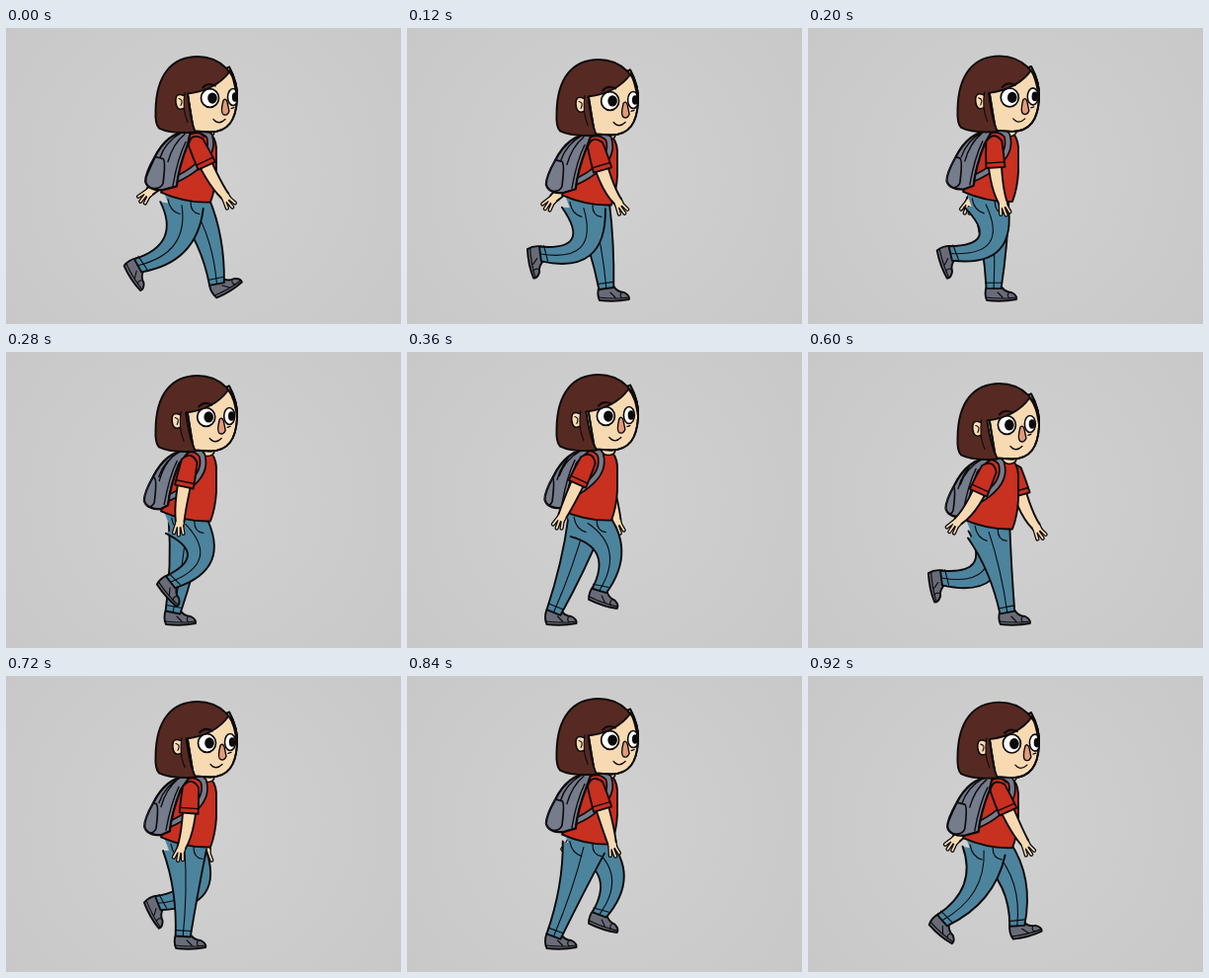
An HTML page with a canvas that plays this animation: 400 px wide and 300 px high, repeating every 0.96 s.

```html
<!DOCTYPE html>
<html lang="en">
<head>
<meta charset="utf-8">
<title>Walk cycle</title>
<style>
html, body { margin: 0; width: 100%; height: 100%; overflow: hidden; background: #cbcbcb; }
canvas { display: block; }
</style>
</head>
<body>
<canvas id="stage" width="400" height="300"></canvas>
<script>
const g = document.getElementById('stage').getContext('2d');
const LOOP = 960, STEP = 40, TAU = Math.PI * 2;
const INK = '#0d0a0b', SKIN = '#f8dab2', HAIR = '#562a22', RED = '#c83020',
      JEANS = '#4c849e', PACK = '#757c8c', SHOE = '#686c78';

const { sin, cos, max, hypot } = Math;
const rad = deg => deg * Math.PI / 180;
const mix = (a, b, u) => [a[0] + (b[0] - a[0]) * u, a[1] + (b[1] - a[1]) * u];

// Point at a distance from p, swung forward from straight down.
const swing = (p, length, deg) => [p[0] + length * sin(rad(deg)), p[1] + length * cos(rad(deg))];

function line(d, width = 1.4, color = INK) {
  g.strokeStyle = color;
  g.lineWidth = width;
  g.stroke(new Path2D(d));
}

function shape(d, fill, width = 1.9) {
  g.fillStyle = fill;
  g.fill(new Path2D(d));
  if (width) line(d, width);
}

function ellipse(x, y, rx, ry, fill, width = 0) {
  g.beginPath();
  g.ellipse(x, y, rx, ry, 0, 0, TAU);
  g.fillStyle = fill;
  g.fill();
  if (width) { g.strokeStyle = INK; g.lineWidth = width; g.stroke(); }
}

function at(x, y, angle, paint) {
  g.save();
  g.translate(x, y);
  g.rotate(angle);
  paint();
  g.restore();
}

// Tapered limb through three points with half widths.
function limb(points, widths, fill, endClosed, roundTop) {
  const [a, b, c] = points;
  const dirs = [[a, b], [a, c], [b, c]].map(([p, q]) => {
    const l = hypot(q[0] - p[0], q[1] - p[1]) || 1;
    return [(q[0] - p[0]) / l, (q[1] - p[1]) / l];
  });
  const side = s => points.map((p, i) =>
    [p[0] - dirs[i][1] * widths[i] * s, p[1] + dirs[i][0] * widths[i] * s]);
  const bend = (p, q, r) => {
    const m = mix(p, r, .5);
    return `Q${[q[0] + .85 * (q[0] - m[0]), q[1] + .85 * (q[1] - m[1])]} ${r}`;
  };
  const L = side(1), R = side(-1);
  const outline = joint => `M${L[0]}${bend(...L)}${joint}${R[2]}${bend(R[2], R[1], R[0])}`;
  const top = [a[0] - dirs[0][0] * widths[0] * 1.4, a[1] - dirs[0][1] * widths[0] * 1.4];
  const cap = roundTop ? `Q${top} ${L[0]}` : '';
  shape(outline('L') + cap, fill, 0);
  line(outline(endClosed ? 'L' : 'M') + cap, 1.9);
  return { mid: `M${a}${bend(a, b, c)}`, band: u => `M${mix(L[2], L[1], u)}L${mix(R[2], R[1], u)}` };
}

function hand(wrist, deg) {
  at(...wrist, rad(90 - deg), () => {
    const fingers = 'M3 -2L12 -4.5M4 1L14 0M3 3L12 5';
    line(fingers, 4.2);
    shape('M-1 -4.5L5 -4Q8 0 5 4L-1 4.5', SKIN, 1.4);
    line(fingers, 1.7, SKIN);
    shape('M-3 -4L5 -3L6 3L-3 4Z', SKIN, 0);
  });
}

// The arm is a pendulum whose forearm trails the upper arm a little.
function arm(phase, shoulder) {
  const upper = -4 + 29 * cos(phase), fore = -5 + 40 * cos(phase - .26);
  const elbow = swing(shoulder, 37, upper), wrist = swing(elbow, 25, fore);
  hand(wrist, fore);
  limb([shoulder, elbow, wrist], [7, 6.2, 4.3], SKIN);
  const sleeve = limb([shoulder, mix(shoulder, elbow, .36), mix(shoulder, elbow, .72)],
    [8, 9, 9.5], RED, true, true);
  line(sleeve.band(.38));
}

// Foot pose: planted and sliding back, then lifted and thrown forward.
function foot(phase) {
  const u = phase / TAU % 1;
  const air = max(0, (u - .39) / .61) ** .85;
  const landing = max(0, 1 - u / .08);
  const x = 170 + 40 * cos(phase) + 10 * sin(phase)
    + 3.5 * cos(2 * phase) - 1.6 * sin(2 * phase) - 2.7 * sin(3 * phase);
  return {
    x,
    lift: 36 * sin(.96 * Math.PI * air) + 4.5 * landing,
    pitch: rad(80 * sin(1.12 * Math.PI * air) - 30 * landing)
  };
}

function leg(phase, hip, hipWidth, near) {
  const { x, lift, pitch } = foot(phase);
  const ankle = [x, 264 - lift];
  const dx = ankle[0] - hip[0], dy = ankle[1] - hip[1], reach = hypot(dx, dy);
  const bend = 2 + .72 * lift;
  const [mx, my] = mix(hip, ankle, .48);
  const knee = [mx + dy / reach * bend, my - dx / reach * bend];

  at(...ankle, pitch, () => {
    shape('M-7 -3L7 -3Q11 4 18 4Q24 7 23 11Q9 14 -7 12Q-10 5 -7 -3Z', SHOE);
    line('M-8 9Q8 11 23 9M4 4L9 9M15 5Q13 7 16 10', 1.1);
  });
  const trouser = limb([hip, knee, ankle], [hipWidth, 12.5, 7.5], JEANS, true);
  line(trouser.band(.13), 1.1);
  line(trouser.mid, 1.1);
  if (near) {
    at(...hip, 0, () => line('M9 -3Q9 8 18 9M-14 -6Q-12 6 -2 9', 1.2));
  }
}

function torso(bob, sx) {
  at(0, bob, 0, () => {
    shape(`M${sx - 9} 108Q${sx} 103 190 103L205 104Q212 108 213 120L213 145Q212 162 207 175Q182 176 157 165Q164 150 165 136Q166 118 ${sx - 9} 108Z`, RED);
    ellipse(204, 104, 7, 5, SKIN, 1.5);
  });
}

function backpack(turn, bob, sx) {
  const r = 6 * turn;
  at(turn, bob, 0, () => {
    const strap = `M178 106Q${sx + 4} 97 ${sx + 13} 108Q${sx + 18} 125 ${sx} 139Q${sx - 8} 146 ${165 + r} 152`;
    line(strap, 7.5);
    line(strap, 4.2, PACK);
    const body = `M184 103Q162 104 149 130Q140 146 140 154Q142 163 157 163L${166 + r} 159Q${168 + r} 140 ${177 + r} 117L186 104Z`;
    shape(body, PACK);
    line(`M177 104Q160 114 155 130M${174 + r} 106Q${162 + r} 116 ${157 + r} 134M${175 + r} 114Q${167 + r} 130 ${162 + r} 158`);
    g.clip(new Path2D(body));
    const p = 6 * turn - 6;
    shape(`M${150 + p} 129L${158 + p} 131Q${161 + p} 133 ${158 + p} 156Q${156 + p} 162 ${146 + p} 161Q${138 + p} 158 ${141 + p} 149Z`, PACK, 1.7);
    line(body, 2.6);
  });
}

function head(turn, bob) {
  const d = 3 * turn - 3, e = d / 2;
  at(0, bob, 0, () => {
    const face = 'M183 60L226 38Q235 54 234 71Q233 87 227 95Q220 104 207 104L190 103Z';
    shape(face, SKIN);
    g.save();
    g.clip(new Path2D(face));
    g.translate(d, 0);
    ellipse(230, 68.5, 5.5, 8.5, '#fff', 1.6);
    ellipse(232, 68.5, 3.2, 4.8, INK);
    ellipse(206.5, 69.5, 9, 9.4, '#fff', 1.7);
    ellipse(209, 69.5, 4.8, 5.6, INK);
    shape('M220 72Q222 69 224 73L226 83Q224 88 220 86Q217 84 220 72', '#e09a7c', 1.4);
    line('M211 92Q216 97 222 91M210 91L212 93M228 80L231 79', 1.3);
    g.restore();
    line(face, 1.9);
    shape(`M234 69C235 44 216 27.5 194 27.5C168 27.5 152 46 151.5 82C151 91 152 97 155 100C165 105 180 105 192 104C187 95 ${186 + e} 80 ${184 + e} 65C${200 + e} 63 ${217 + e} 56 ${227 + e} 42C231 50 232 58 234 69Z`, HAIR);
    g.translate(d, 0);
    line('M199 59Q204 53 212 57', 2);
    shape('M180 67Q171 63 172 74Q173 83 180 80', SKIN, 1.5);
    line('M175 70Q180 71 177 77M181 64Q178 80 184 94', 1.1);
  });
}

const backdrop = g.createRadialGradient(200, 150, 20, 200, 150, 250);
backdrop.addColorStop(0, '#d0d0d0');
backdrop.addColorStop(1, '#c8c8c8');
g.lineCap = g.lineJoin = 'round';

function draw() {
  const t = Math.floor(performance.now() / STEP) * STEP % LOOP;
  const phase = TAU * t / LOOP, opposite = phase + Math.PI;
  const bob = 4.7 * cos(2 * phase - 1.24);
  const turn = cos(phase);
  const sx = 187 + 5 * turn;

  g.fillStyle = backdrop;
  g.fillRect(0, 0, 400, 300);
  arm(opposite, [194 - 14 * cos(phase - .7), 115 + bob]);
  leg(phase, [184 + 5 * turn, 178 + bob], 18, false);
  at(0, bob, 0, () => shape('M160 165L206 172L198 186L168 186Z', JEANS, 0));
  leg(opposite, [181 - 3 * turn, 178 + bob], 22, true);
  torso(bob, sx);
  backpack(turn, bob, sx);
  arm(phase, [sx, 114 + bob]);
  head(turn, bob);
  requestAnimationFrame(draw);
}
draw();
</script>
</body>
</html>
```
